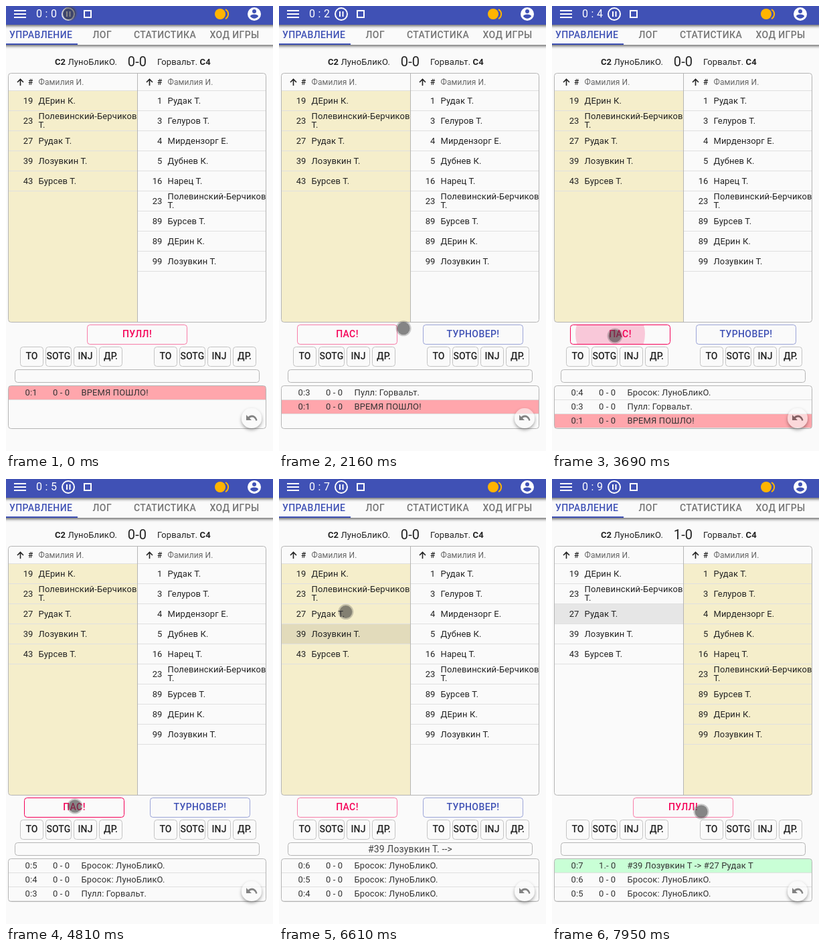
Animation, 399 px wide and 665 px high, one loop 8000 ms. Source, as an HTML page:

```html
<!DOCTYPE html>
<html lang="ru">
<head>
<meta charset="utf-8">
<style>
html, body { margin: 0; width: 100%; height: 100%; overflow: hidden; background: #fafafa; }
svg { display: block; width: 399px; height: 665px; font: 13px Roboto, sans-serif; letter-spacing: .13px; fill: #222; }
text { white-space: pre; }
</style>
</head>
<body>
<svg id="stage" viewBox="0 0 399 665"></svg>
<script>
const LOOP = 8000;
// bursts of screen updates: first, last, count
const BURSTS = [[0, 280, 3], [550, 1490, 8], [1620, 2590, 8], [2720, 3390, 6], [3690, 4100, 4],
  [4400, 4810, 4], [5110, 6070, 8], [6220, 7120, 8], [7270, 7950, 6]];
const PATH = [[0, 95, 11], [150, 215, 140], [280, 312, 280], [420, 312, 280], [960, 40, 300],
  [1490, 182, 482], [2030, 186, 482], [2590, 193, 463], [2720, 193, 463], [3390, 94, 493],
  [4100, 94, 493], [4400, 100, 490], [4810, 103, 489], [5250, 103, 489], [6070, 92, 234],
  [6350, 92, 234], [6610, 100, 198], [7120, 100, 198], [7540, 290, 400], [7950, 223, 497]];
const PULL = 2030, PASSES = [3590, 4350, 5020], PICK = 6200, GOAL = 6800;

const BLUE = '#3f51b5', PINK = '#f50057', YELLOW = '#f5eecb';
const HOME = 'ЛуноБликО.', AWAY = 'Горвальт.';
const LONG = 'Полевинский-Берчиков Т.';
const left = [[19, 'ДЕрин К.'], [23, LONG], [27, 'Рудак Т.'], [39, 'Лозувкин Т.'], [43, 'Бурсев Т.']];
const right = [[1, 'Рудак Т.'], [3, 'Гелуров Т.'], [4, 'Мирдензорг Е.'], [5, 'Дубнев К.'], [16, 'Нарец Т.'],
  [23, LONG], [89, 'Бурсев Т.'], [89, 'ДЕрин К.'], [99, 'Лозувкин Т.']];

const text = (x, y, s, attrs = '') => `<text x="${x}" y="${y}" ${attrs}>${s}</text>`;
const rect = (x, y, w, h, attrs) => `<rect x="${x}" y="${y}" width="${w}" height="${h}" ${attrs}/>`;
const circle = (x, y, r, attrs) => `<circle cx="${x}" cy="${y}" r="${r}" ${attrs}/>`;
const path = (d, attrs) => `<path d="${d}" ${attrs}/>`;
const frame = (x, y, w, h, color = '#b5b5b5') => rect(x + .5, y + .5, w - 1, h - 1, `rx="4" fill="none" stroke="${color}"`);
const middle = 'text-anchor="middle"', end = 'text-anchor="end"';

function snap(t) {
  let shown = 0;
  for (const [a, b, n] of BURSTS)
    for (let i = 0; i < n; i++) {
      const at = a + (b - a) * i / (n - 1);
      if (at <= t + .01) shown = at;
    }
  return shown;
}

function pointer(t) {
  const i = Math.max(1, PATH.findIndex(k => k[0] >= t));
  const [t0, x0, y0] = PATH[i - 1], [t1, x1, y1] = PATH[i];
  const u = (t - t0) / (t1 - t0);
  return [x0 + (x1 - x0) * u, y0 + (y1 - y0) * u];
}

function header(t) {
  const secs = t < 110 ? 0 : Math.min(9, 1 + Math.floor((t - 110) / 980));
  const big = 'font-size="16" fill="#fff" ' + middle;
  const tab = 'font-size="14" font-weight="500" letter-spacing=".4" fill=';
  return rect(-10, 28, 419, 30, 'fill="#fafafa" filter="url(#bar)"') +
    rect(-10, 0, 419, 28, `fill="${BLUE}" filter="url(#bar)"`) +
    path('M12 7h18M12 12h18M12 17h18', 'stroke="#fff" stroke-width="2"') +
    text(49.5, 17, 0, big) + text(60.5, 17, ':', big) + text(71.5, 17, secs, big) +
    circle(93, 12, 9, 'fill="none" stroke="#fff" stroke-width="2"') +
    path('M91 8v8M95.5 8v8', 'stroke="#fff" stroke-width="2"') +
    rect(117, 7, 10, 10, 'fill="none" stroke="#fff" stroke-width="2"') +
    circle(320, 12, 8, 'fill="#ffb400"') +
    path('M328 5a8 8 0 0 1 0 14', 'fill="none" stroke="#ffb400" stroke-width="2"') +
    circle(371, 12, 10, 'fill="#fff"') + circle(371, 8, 3, `fill="${BLUE}"`) +
    path('M365 15.5c0-4 12-4 12 0a7.2 7.2 0 0 1-12 0', `fill="${BLUE}"`) +
    text(5, 48, 'УПРАВЛЕНИЕ', tab + `"${BLUE}"`) + text(129.5, 48, 'ЛОГ', tab + '"#757575"') +
    text(191, 48, 'СТАТИСТИКА', tab + '"#757575"') + text(304.5, 48, 'ХОД ИГРЫ', tab + '"#757575"') +
    rect(0, 56, 107, 2, `fill="${BLUE}"`);
}

function team(x, list, active, picked) {
  let s = active ? rect(x, 127, 192, 345, `fill="${YELLOW}"`) : '';
  s += path(`M${x + 13} 114l4.5-4.5 4.5 4.5M${x + 17.5} 110v9`, 'fill="none" stroke="#222" stroke-width="1.6"') +
    text(x + 29, 118, '#', 'font-size="12" font-weight="500"') +
    text(x + 44.5, 118, 'Фамилия И.', 'font-size="12" fill="#666"') +
    rect(x, 126, 192, 1, 'fill="#e0e0e0"');
  list.forEach(([num, name], i) => {
    const y = 127 + i * 30;
    if (num === picked) s += rect(x, y, 192, 29, 'fill="#000" fill-opacity=".08"');
    s += rect(x, y + 29, 192, 1, 'fill="#e0e0e0"') + text(x + 36.5, y + 19, num, end);
    if (name === LONG) {
      const [a, b] = name.split(' ');
      s += text(x + 44.5, y + 12, a) + text(x + 44.5, y + 25, b);
    } else s += text(x + 44.5, y + 19, name);
  });
  return s;
}

function button(x, label, color, hover, clicks, t) {
  let s = '';
  for (const at of clicks) {
    const age = t - at;
    if (age < 0 || age > 450) continue;
    const alpha = .2 * Math.min(1, (450 - age) / 300);
    s += `<svg x="${x}" y="476" width="150" height="30">` +
      circle(60, 14, 20 + age * .32, `fill="${color}" fill-opacity="${alpha}"`) + '</svg>';
  }
  return s + `<g stroke-opacity="${hover ? 1 : .5}">${frame(x, 476, 150, 30, color)}</g>` +
    text(x + 75, 495, label, `font-size="14" font-weight="500" letter-spacing=".4" fill="${color}" ${middle}`);
}

function controls(t, px, py) {
  const over = x => py > 478 && py < 505 && px > x && px < x + 150;
  let s = t < PULL || t >= GOAL
    ? button(121, 'ПУЛЛ!', PINK, t > 1550 && t < PULL, [1900], t)
    : button(27, 'ПАС!', PINK, over(27), PASSES, t) + button(215, 'ТУРНОВЕР!', BLUE, false, [], t);
  for (const dx of [0, 200])
    for (const [x, w, label] of [[21, 35, 'ТО'], [59, 39, 'SOTG'], [101, 35, 'INJ'], [139, 35, 'ДР.']])
      s += frame(x + dx, 509, w, 30, '#c4c4c4') +
        text(x + dx + w / 2, 528, label, 'font-size="14" font-weight="500" ' + middle);
  s += frame(13, 543, 366, 20);
  if (t >= PICK && t < GOAL) s += text(196, 558, '#39 Лозувкин Т. --&gt;', 'font-size="14" fill="#444" ' + middle);
  return s;
}

function log(t) {
  const events = [[0, '0:1', '0 - 0', 'ВРЕМЯ ПОШЛО!', '#ffa6ac'], [PULL, '0:3', '0 - 0', 'Пулл: ' + AWAY],
    ...PASSES.map((at, i) => [at, '0:' + (4 + i), '0 - 0', 'Бросок: ' + HOME]),
    [GOAL, '0:7', '1.- 0', '#39 Лозувкин Т -&gt; #27 Рудак Т', '#c9ffd6']];
  const rows = events.filter(e => e[0] <= t).reverse().slice(0, 3).map(([, time, score, note, color], i) => {
    const y = 568 + i * 21;
    return (color ? rect(4, y, 384, 20, `fill="${color}"`) : '') + rect(4, y + 20, 384, 1, 'fill="#e0e0e0"') +
      text(28.5, y + 14, time) + text(70, y + 14, score) + text(112.5, y + 14, note);
  });
  return `<g fill="#333">${rows.join('')}</g>` + frame(3, 567, 386, 65);
}

function undo() {
  return '<g opacity=".6">' + circle(367, 616, 15, 'fill="#fafafa" filter="url(#fab)"') +
    path('M359 611v8h8l-3-3c4-3 8-1 9.500 4l2-1c-2-7-8-10-13.500-5z', 'fill="#333"') + '</g>';
}

function scene(t) {
  const [px, py] = pointer(t), scored = t >= GOAL;
  const bold = 'font-weight="700"';
  return `<defs>
    <filter id="bar" y="-50%" height="200%"><feDropShadow dx="0" dy="2" stdDeviation="2" flood-opacity=".6"/></filter>
    <filter id="fab" x="-50%" y="-50%" width="200%" height="200%"><feDropShadow dx="0" dy="2.5" stdDeviation="2.5" flood-opacity=".6"/></filter>
    </defs>` + header(t) +
    text(166, 88, `<tspan ${bold}>C2</tspan> ${HOME}`, end) +
    text(196, 90, scored ? '1-0' : '0-0', 'font-size="20" ' + middle) +
    text(226, 88, `${AWAY} <tspan ${bold}>C4</tspan>`) +
    team(4, left, !scored, scored ? 27 : t >= PICK ? 39 : 0) + team(197, right, scored, 0) +
    rect(196, 101, 1, 371, 'fill="#b5b5b5"') + frame(3, 100, 386, 373) +
    controls(t, px, py) + log(t) + undo() +
    circle(px, py, 11.5, 'fill="#555" fill-opacity=".3"') + circle(px, py, 9.5, 'fill="#333" fill-opacity=".45"');
}

const stage = document.getElementById('stage');
let last = -1;
function tick(now) {
  const t = snap(now % LOOP);
  if (t !== last) stage.innerHTML = scene(last = t);
  requestAnimationFrame(tick);
}
tick(performance.now());
</script>
</body>
</html>
```
